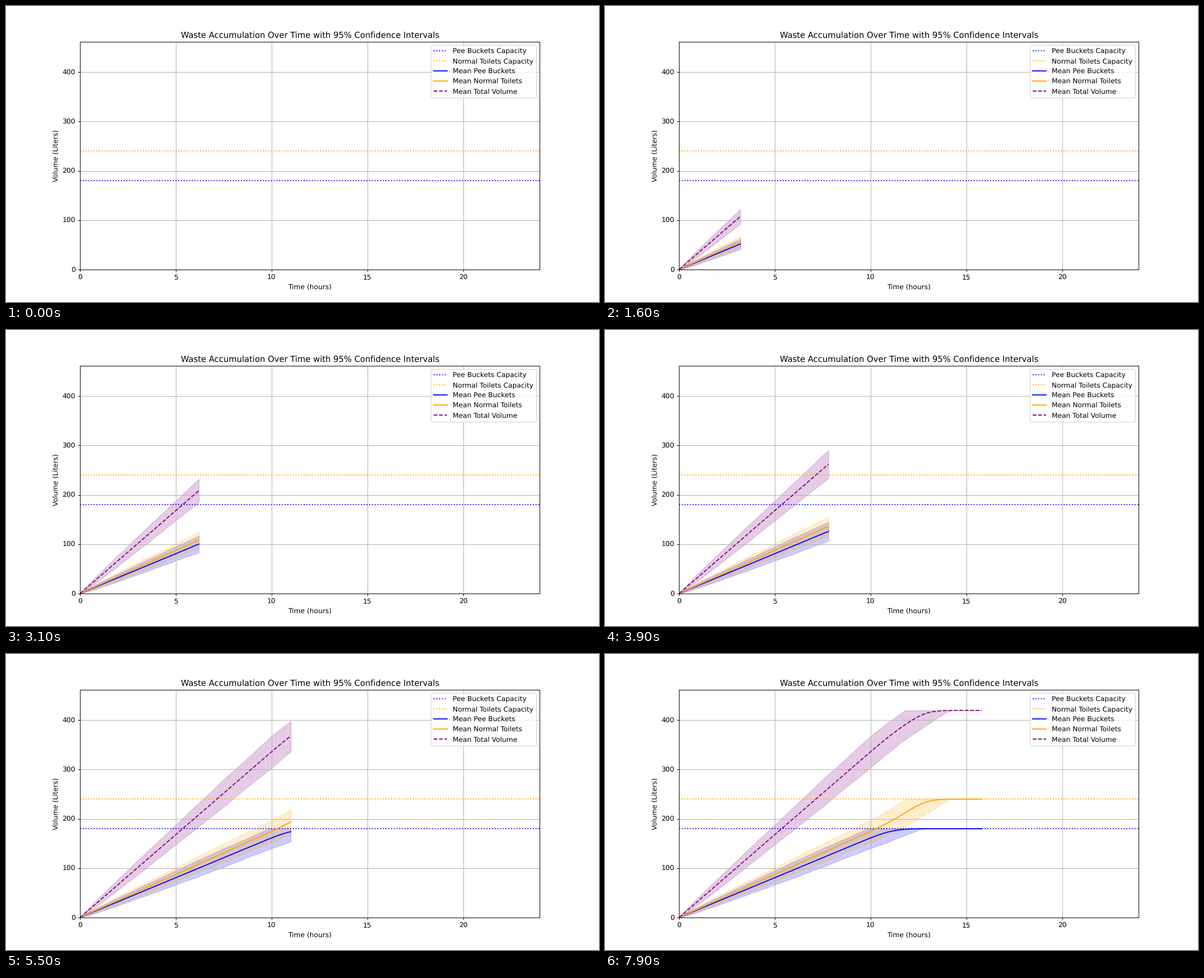
These frames come from a looping animation (1058x529 px, 8 s). A matplotlib script:

```python
import numpy as np
import matplotlib.pyplot as plt
from matplotlib.animation import FuncAnimation

WIDTH = 1058
FRAMES, INTERVAL = 80, 100
STEP = 0.2                              # hours per frame
PEE_CAP, TOILET_CAP = 180, 240
PEE_RATE, TOILET_RATE = 16.15, 17.47    # litres per hour
SPREAD, GROWTH = 2.55, 0.65             # deviation = SPREAD * t ** GROWTH
OVERFLOW_SHARE = 0.52
RUNS = 1500

hours = np.arange(FRAMES) * STEP
rng = np.random.default_rng(4)


def simulate(rate):
    """Random walks around rate * t, in mirrored pairs so the mean is exact."""
    scale = SPREAD * np.sqrt(np.diff(hours ** (2 * GROWTH), prepend=0))
    walk = np.cumsum(rng.normal(size=(RUNS, FRAMES)) * scale, axis=1)
    return rate * hours + np.vstack([walk, -walk])


demand = simulate(PEE_RATE)
pee = np.clip(demand, 0, PEE_CAP)
overflow = OVERFLOW_SHARE * np.maximum(demand - PEE_CAP, 0)
toilet = np.clip(simulate(TOILET_RATE) + overflow, 0, TOILET_CAP)

plt.rcParams["text.hinting"] = "none"
fig, ax = plt.subplots(figsize=(12, 6), dpi=WIDTH / 12)
fig.subplots_adjust(top=0.8795)
ax.set_xlim(0, 24)
ax.set_ylim(0, (PEE_CAP + TOILET_CAP) * 1.1)
ax.set_xlabel("Time (hours)")
ax.set_ylabel("Volume (Liters)")
ax.set_title("Waste Accumulation Over Time with 95% Confidence Intervals")
ax.grid(True)

ax.axhline(PEE_CAP, color="blue", ls=":", label="Pee Buckets Capacity")
ax.axhline(TOILET_CAP, color="orange", ls=":", label="Normal Toilets Capacity")


def series(runs, color, style, label):
    line, = ax.plot([], [], color=color, ls=style, label=label)
    low, high = np.percentile(runs, [2.5, 97.5], axis=0)
    return line, runs.mean(axis=0), low, high


all_series = [
    series(pee, "blue", "-", "Mean Pee Buckets"),
    series(toilet, "orange", "-", "Mean Normal Toilets"),
    series(pee + toilet, "purple", "--", "Mean Total Volume"),
]
ax.legend(loc="upper right", labelspacing=0.53)


def update(frame):
    for band in list(ax.collections):
        band.remove()
    n = frame + 1
    for line, mean, low, high in all_series:
        line.set_data(hours[:n], mean[:n])
        if frame:
            ax.fill_between(hours[:n], low[:n], high[:n],
                            color=line.get_color(), alpha=0.2)
    return []


anim = FuncAnimation(fig, update, frames=FRAMES, interval=INTERVAL,
                     init_func=lambda: update(0), repeat=True, repeat_delay=0)
plt.show()
```
